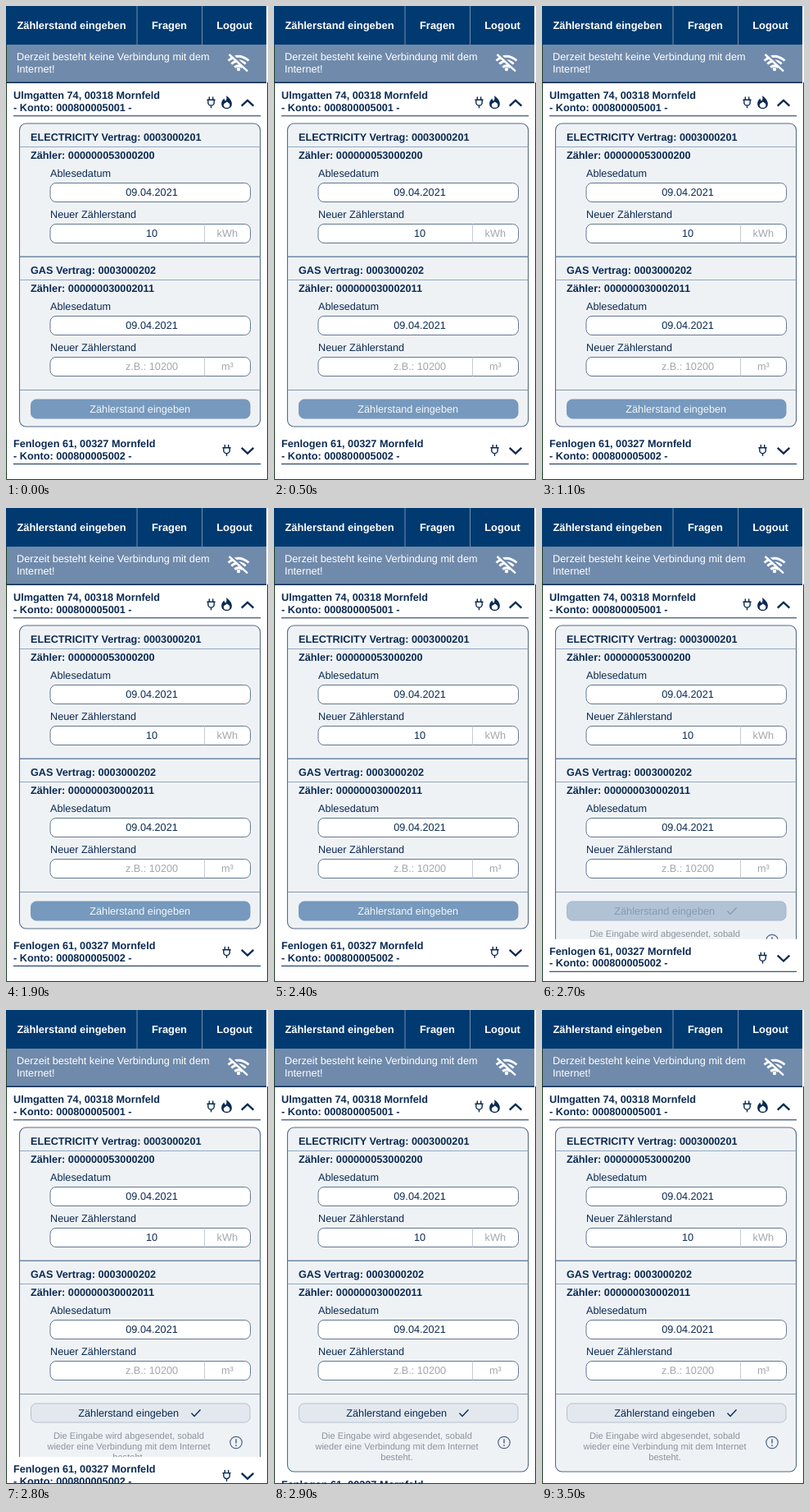
An HTML page that plays this animation: 320x577 px, repeating every 3.6 s.

```html
<!DOCTYPE html>
<html lang="de">
<head>
<meta charset="utf-8">
<title>Zählerstand eingeben</title>
<style>
html, body { margin: 0; width: 100%; height: 100%; overflow: hidden; background: #fff; }
svg { display: block; width: 320px; height: 577px; }
text { font: 12.7px "Liberation Sans", Arial, sans-serif; fill: #0b2a52; text-rendering: geometricPrecision; }
.bold { font-weight: bold; }
.nav { font-size: 12.9px; font-weight: bold; fill: #fff; }
.light { fill: #fff; }
.hint { fill: #a3a6ab; }
.info { font-size: 11.1px; fill: #8a929c; }
.mid { text-anchor: middle; }
.line { fill: none; stroke: #0b2a52; }
.field { fill: #fff; stroke: #637790; }
</style>
</head>
<body>
<svg viewBox="0 0 320 577">
  <defs>
    <clipPath id="clip"><rect id="clipBox" y="136" width="320" height="382"/></clipPath>
    <g id="plug" class="line" stroke-width="1.4" stroke-linecap="round">
      <path d="M-2.2-6V-3M2.2-6V-3M-4.6-2.8H4.6M-3.7-2.8V.4A3.7 3.7 0 0 0 3.7.4V-2.8M0 4.2V6.8"/>
    </g>
    <path id="flame" fill="#0b2a52" fill-rule="evenodd" d="M-.8-8C3-5.4 6.4-2 6.4 2.2A6.4 6 0 0 1-6.4 2.2C-6.4-.6-4.8-2.8-3-4.4-2.9-3-2.4-2-1.3-1.6 .2-3 .4-5.6-.8-8ZM.3-.6C-1 1-3.7 1.2-3.7 3.4A3.8 3.4 0 0 0 3.9 3.4C3.9 1.6 2 .8.3-.6Z"/>
    <path id="chevron" class="line" stroke-width="2.3" d="M-7.3 3.6 0-3.2 7.3 3.6"/>
  </defs>

  <rect width="320" height="577" fill="#fff"/>
  <g clip-path="url(#clip)">
    <rect id="panel" x="16.5" y="143" width="294" height="369" rx="8" fill="#eff2f5" stroke="#536b8a" stroke-width="1.1"/>
    <g id="meters"></g>
    <path d="M17 467.5H310.5" stroke="#7f97b3" stroke-width="1.2"/>
    <rect id="button" x="30.5" y="479" width="267.5" height="23" rx="6.5"/>
    <text id="label" class="mid" y="494.5">Zählerstand eingeben</text>
    <path id="check" fill="none" stroke-width="1.4" d="M226.5 490.8 230 494.5 237.5 486.5"/>
    <g id="info">
      <text class="info mid" x="150" y="522">Die Eingabe wird abgesendet, sobald</text>
      <text class="info mid" x="150" y="534.8">wieder eine Verbindung mit dem Internet</text>
      <text class="info mid" x="150" y="547.6">besteht.</text>
      <circle cx="281" cy="526.5" r="7.2" fill="none" stroke="#4d6484" stroke-width="1.2"/>
      <path d="M281 522.3V527.5M281 529.3V531" stroke="#4d6484" stroke-width="1.5"/>
    </g>
  </g>

  <g>
    <text class="bold" x="9" y="113">Ulmgatten 74, 00318 Mornfeld</text>
    <text class="bold" x="9" y="128">- Konto: 000800005001 -</text>
    <use href="#plug" x="250.5" y="117"/>
    <use href="#flame" x="269.5" y="117"/>
    <use href="#chevron" x="295" y="118"/>
    <path class="line" d="M9 133.8H311"/>
  </g>
  <g id="second">
    <text class="bold" x="9" y="537.3">Fenlogen 61, 00327 Mornfeld</text>
    <text class="bold" x="9" y="551.7">- Konto: 000800005002 -</text>
    <use href="#plug" x="269.5" y="540.5"/>
    <use href="#chevron" transform="translate(295 541.5) scale(1 -1)"/>
    <path class="line" d="M9 557.5H311"/>
  </g>

  <rect width="318" height="47" fill="#003a70"/>
  <path d="M160 0V47M239.5 0V47" stroke="#6f8fb0"/>
  <text class="nav mid" x="80" y="28">Zählerstand eingeben</text>
  <text class="nav mid" x="199.5" y="28">Fragen</text>
  <text class="nav mid" x="279" y="28">Logout</text>
  <rect y="47" width="318" height="46" fill="#708aab"/>
  <path d="M0 93.3H318" stroke="#0b2a52" stroke-width="1.6"/>
  <text class="light" x="13" y="66.3">Derzeit besteht keine Verbindung mit dem</text>
  <text class="light" x="13" y="80.8">Internet!</text>
  <g fill="none" stroke="#fff" stroke-width="2.9">
    <path d="M271.5 66.5Q284 56 296.5 66.5M275.3 70.5Q284 63.2 292.7 70.5M279.2 74.5Q284 70.8 288.8 74.5"/>
    <path d="M273.5 57.5 296.5 78" stroke="#708aab" stroke-width="3"/>
    <path d="M272.5 59 295 79.3" stroke-width="2.4"/>
    <circle cx="284" cy="77" r="2.2" fill="#fff" stroke="none"/>
  </g>
  <path d="M.5 47V576.5H319.5V93" fill="none" stroke="#1c3d24"/>
</svg>
<script>
const LOOP = 3600, PRESS = 2600, OPEN_TIME = 400;
const PANEL_GROWTH = 50, ROW_TRAVEL = 51.5;
const $ = id => document.getElementById(id);
const set = (id, attrs) => {
  for (const name in attrs) $(id).setAttribute(name, attrs[name]);
};

const field = y => `<rect class="field" x="54" y="${y}" width="244.5" height="23" rx="7"/>`;

function meter(top, title, number, value, unit, valueClass) {
  return `<g transform="translate(0 ${top})">
    ${top > 143 ? '<path d="M17 .3H310.5" stroke="#6f89a9" stroke-width="1.4"/>' : ''}
    <path d="M17 28.5H310.5" stroke="#8fa9c5" stroke-width="1.2"/>
    <text class="bold" x="30" y="20.7">${title}</text>
    <text class="bold" x="30" y="43">Zähler: ${number}</text>
    <text x="54" y="64.7">Ablesedatum</text>
    ${field(72.5)}
    <text class="mid" x="178" y="88.3">09.04.2021</text>
    <text x="54" y="115">Neuer Zählerstand</text>
    ${field(122.5)}
    <path d="M242.5 122.5V145.5" stroke="#c5ccd4"/>
    <text class="mid ${valueClass}" x="178" y="138.3">${value}</text>
    <text class="mid hint" x="270.3" y="137.5">${unit}</text>
  </g>`;
}

$('meters').innerHTML =
  meter(143, 'ELECTRICITY Vertrag: 0003000201', '000000053000200', '10', 'kWh', '') +
  meter(305, 'GAS Vertrag: 0003000202', '000000030002011', 'z.B.: 10200', 'm³', 'hint');

// cubic-bezier(.42, 0, .58, 1), solved by bisection
function easeInOut(x) {
  let lo = 0, hi = 1;
  for (let i = 0; i < 20; i++) {
    const s = (lo + hi) / 2, r = 1 - s;
    if (1.26 * r * r * s + 1.74 * r * s * s + s ** 3 < x) lo = s; else hi = s;
  }
  return lo * lo * (3 - 2 * lo);
}

// blends through three colours, reaching one every 100 ms
function fade(colours, elapsed) {
  const k = Math.min(Math.max(elapsed / 100, 0), 2), i = Math.min(Math.floor(k), 1);
  return `rgb(${colours[i].map((c, n) => Math.round(c + (colours[i + 1][n] - c) * (k - i)))})`;
}

function draw(t) {
  const sent = t >= PRESS, elapsed = t - PRESS;
  const shift = sent ? ROW_TRAVEL * easeInOut(Math.min(elapsed / OPEN_TIME, 1)) : 0;
  const ink = sent ? fade([[219, 232, 242], [137, 156, 180], [11, 42, 82]], elapsed) : '#f4f7fa';
  set('panel', { height: sent ? 369 + PANEL_GROWTH : 369 });
  set('clipBox', { height: 382 + shift });
  set('second', { transform: `translate(0 ${shift})` });
  set('button', {
    fill: sent ? fade([[103, 163, 203], [176, 194, 213], [227, 232, 239]], elapsed) : '#7699bd',
    stroke: sent ? fade([[103, 163, 203], [160, 181, 205], [180, 192, 208]], elapsed) : '#7699bd'
  });
  set('label', { x: sent ? 149.7 : 163.7, style: `fill:${ink}` });
  set('check', { stroke: ink, visibility: sent ? 'visible' : 'hidden' });
  set('info', { visibility: sent ? 'visible' : 'hidden' });
}

const start = performance.now();
function tick() {
  draw((performance.now() - start) % LOOP);
  requestAnimationFrame(tick);
}
draw(0);
requestAnimationFrame(tick);
</script>
</body>
</html>
```
